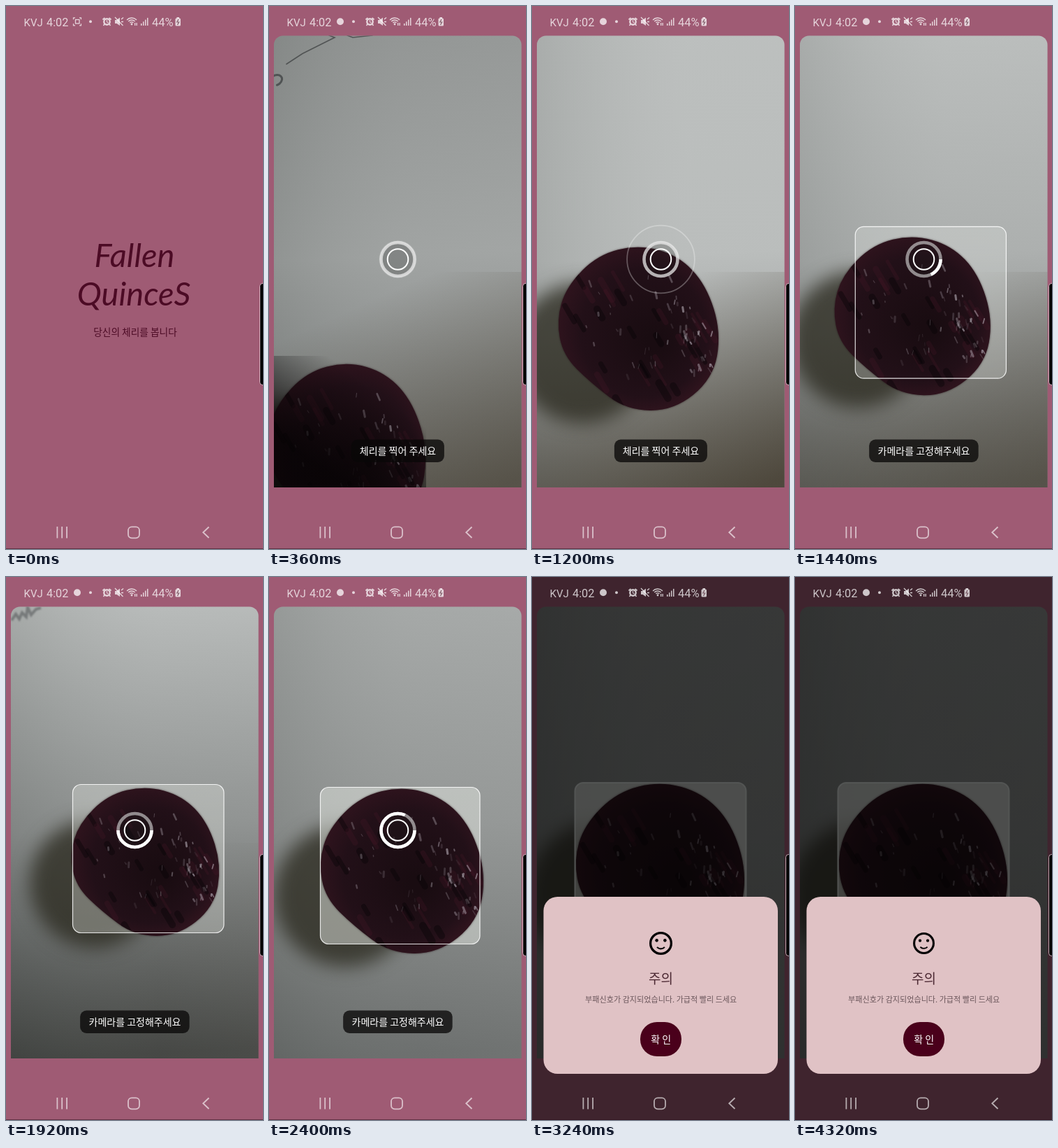
Write an HTML page with a canvas that moves like this. It is 368x776 px and loops after 4.44 s.

```html
<!DOCTYPE html>
<html lang="ko">
<head>
<meta charset="utf-8">
<title>Cherry scanner</title>
<style>
  html, body { margin: 0; width: 100%; height: 100%; overflow: hidden; background: #9f5b74; }
  canvas { display: block; width: 368px; height: 776px; }
</style>
</head>
<body>
<canvas id="stage"></canvas>
<script>
const W = 368, H = 776, LOOP = 4440, STEP = 120;
const KR = '"Noto Sans CJK KR", "Noto Sans CJK JP", "Noto Sans CJK", sans-serif';
const PINK = '#9f5b74';
const canvas = document.getElementById('stage');
const ctx = canvas.getContext('2d');
const ratio = window.devicePixelRatio || 1;
canvas.width = W * ratio;
canvas.height = H * ratio;

// time, cherry x, y, rx, ry, grey at top, middle, bottom, corner shade
const CAMERA = [
  [240, 108, 645, 113, 121, 144, 160, 122, .5],
  [360, 112, 632, 113, 121, 147, 161, 125, .5],
  [1200, 153, 461, 115, 117, 190, 188, 134, .62],
  [1920, 200, 407, 106, 106, 187, 142, 66, .12],
  [2400, 191, 420, 117, 118, 167, 147, 106, 0],
  [2640, 184, 417, 121, 122, 134, 127, 112, 0]
];
// time, x, y, width, height, brightness inside
const FRAME = [
  [1320, 84, 320, 216, 218, .28],
  [1920, 95.5, 296.5, 216.5, 212, .34],
  [2400, 73.5, 300.5, 228.5, 224, .5],
  [2640, 61.5, 294, 245, 244, .62]
];
const BLOB = [[-1, -.1], [-.88, -.5], [-.5, -.88], [0, -1], [.48, -.87], [.82, -.52],
  [1, .05], [.9, .6], [.42, .98], [-.15, .97], [-.58, .65], [-.92, .32]];

const clamp = v => Math.max(0, Math.min(1, v));
const ease = v => { v = clamp(v); return v * v * (3 - 2 * v); };
const easeOut = v => 1 - Math.pow(1 - clamp(v), 3);
const grey = v => `rgb(${v - 2},${v + 1},${v})`;

function sample(keys, t) {
  if (t <= keys[0][0]) return keys[0].slice(1);
  for (let i = 1; i < keys.length; i++) {
    const a = keys[i - 1], b = keys[i];
    if (t <= b[0]) {
      const k = (t - a[0]) / (b[0] - a[0]);
      return a.slice(1).map((v, j) => v + (b[j + 1] - v) * k);
    }
  }
  return keys[keys.length - 1].slice(1);
}

function random(seed) {
  return () => (seed = (seed * 16807) % 2147483647) / 2147483647;
}

function group(draw) {
  ctx.save();
  draw();
  ctx.restore();
}

function round(x, y, w, h, r) {
  ctx.beginPath();
  ctx.roundRect(x, y, w, h, r);
}

function circle(x, y, r) {
  ctx.beginPath();
  ctx.arc(x, y, r, 0, Math.PI * 2);
}

function line(points, width) {
  ctx.lineWidth = width;
  ctx.beginPath();
  points.forEach(p => ctx.lineTo(p[0], p[1]));
  ctx.stroke();
}

function text(str, x, y, font, color, align = 'center') {
  ctx.font = font;
  ctx.fillStyle = color;
  ctx.textAlign = align;
  ctx.textBaseline = 'alphabetic';
  ctx.fillText(str, x, y);
}

function blobPath() {
  const n = BLOB.length, at = i => BLOB[i % n];
  const mid = (a, b) => [(a[0] + b[0]) / 2, (a[1] + b[1]) / 2];
  ctx.beginPath();
  ctx.moveTo(...mid(at(n - 1), at(0)));
  for (let i = 0; i < n; i++) ctx.quadraticCurveTo(...at(i), ...mid(at(i), at(i + 1)));
  ctx.closePath();
}

function cherry(cx, cy, rx, ry) {
  group(() => {
    ctx.translate(cx, cy);
    ctx.scale(rx * 1.025, ry * 1.025);
    blobPath();
    const g = ctx.createRadialGradient(.2, .15, .1, 0, 0, 1.05);
    g.addColorStop(0, '#190c11');
    g.addColorStop(.7, '#221018');
    g.addColorStop(1, '#31141e');
    ctx.fillStyle = g;
    ctx.shadowColor = 'rgba(30,14,18,.7)';
    ctx.shadowBlur = 3;
    ctx.fill();
    ctx.shadowBlur = 0;
    ctx.clip();
    ctx.lineCap = 'round';
    const rnd = random(71);
    for (let i = 0; i < 34; i++) {
      const x = rnd() * 1.7 - .9, y = rnd() * 1.7 - .85;
      const len = .06 + rnd() * .2;
      ctx.strokeStyle = i % 2 ? 'rgba(78,24,42,.22)' : 'rgba(6,3,5,.4)';
      line([[x, y], [x + len * .6, y + len]], .03 + rnd() * .06);
    }
    for (let i = 0; i < 62; i++) {
      const right = i % 5 < 3;
      const x = right ? .3 + rnd() * .6 : rnd() * 1.1 - .65;
      const y = right ? x * .8 - .75 + rnd() * .8 : rnd() * 1.3 - .65;
      const len = .015 + rnd() * .06;
      ctx.strokeStyle = `rgba(196,188,198,${.08 + rnd() * (right ? .5 : .28)})`;
      line([[x, y], [x + len * (rnd() - .3), y + len]], .008 + rnd() * .02);
    }
  });
}

function penMarks(t, cx, cy) {
  group(() => {
    ctx.lineCap = 'round';
    ctx.filter = 'blur(.7px)';
    ctx.strokeStyle = 'rgba(62,64,66,.75)';
    ctx.translate(cx - 112, cy - 632);
    line([[25, 83], [48, 68], [72, 56], [94, 45], [86, 42]], 1.6);
    line([[112, 42], [120, 45], [148, 42]], 1.4);
    ctx.lineWidth = 3;
    ctx.beginPath();
    ctx.ellipse(10, 106, 9, 7, -.5, -1.8, 1.8);
    ctx.stroke();
  });
  if (t < 1700 || t > 2160) return;
  group(() => {
    ctx.translate(cx - 200, cy - 407);
    ctx.filter = 'blur(1px)';
    ctx.strokeStyle = 'rgba(92,96,98,.65)';
    line([[8, 62], [14, 53], [19, 60], [23, 51], [29, 57], [31, 43], [36, 54], [43, 46], [50, 44]], 4);
  });
}

function photo(t) {
  const [cx, cy, rx, ry, top, mid, bottom, corner] = sample(CAMERA, t);
  group(() => {
    round(7, 42.5, 354.5, 645.5, [13, 13, 0, 0]);
    ctx.clip();
    let g = ctx.createLinearGradient(0, 42, 30, 688);
    g.addColorStop(0, grey(top));
    g.addColorStop(.5, grey(mid));
    g.addColorStop(1, grey(bottom));
    ctx.fillStyle = g;
    ctx.fillRect(0, 40, W, 650);
    g = ctx.createLinearGradient(7, 0, 361, 0);
    g.addColorStop(0, 'rgba(70,76,72,.16)');
    g.addColorStop(.6, 'rgba(190,194,192,.06)');
    g.addColorStop(1, 'rgba(190,194,192,.1)');
    ctx.fillStyle = g;
    ctx.fillRect(0, 40, W, 650);
    g = ctx.createLinearGradient(170, 410, 300, 700);
    g.addColorStop(0, 'rgba(64,56,42,0)');
    g.addColorStop(1, `rgba(64,56,42,${corner * 1.3})`);
    ctx.fillStyle = g;
    ctx.fillRect(0, 380, W, 310);
    penMarks(t, cx, cy);

    group(() => {
      ctx.filter = 'blur(13px)';
      ctx.fillStyle = 'rgba(44,43,32,.78)';
      ctx.beginPath();
      ctx.ellipse(cx - rx * .7, cy + ry * .3, rx * .87, ry * .86, .5, 0, Math.PI * 2);
      ctx.fill();
    });

    const boxed = t >= 1320;
    const [x, y, w, h, light] = sample(FRAME, t);
    if (boxed) {
      round(x, y, w, h, 12);
      ctx.fillStyle = `rgba(228,231,226,${light})`;
      ctx.fill();
    }
    cherry(cx, cy, rx, ry);
    if (t < 900) {
      g = ctx.createLinearGradient(140, 540, 60, 650);
      g.addColorStop(0, 'rgba(4,2,3,0)');
      g.addColorStop(1, `rgba(4,2,3,${.8 * clamp((900 - t) / 500)})`);
      ctx.fillStyle = g;
      ctx.fillRect(0, 500, 225, 190);
    }
    if (boxed) {
      round(x, y, w, h, 12);
      ctx.strokeStyle = 'rgba(255,255,255,.85)';
      ctx.lineWidth = t < 2640 ? 1.2 : 2;
      if (t >= 2640) ctx.strokeStyle = 'rgba(215,220,218,.85)';
      ctx.stroke();
    }
  });
}

function reticle(t) {
  const x = 184.5, y = 362, found = t >= 1320;
  circle(x, y, 24);
  ctx.fillStyle = 'rgba(30,30,30,.22)';
  ctx.fill();
  ctx.lineWidth = 4.6;
  ctx.strokeStyle = found ? 'rgba(215,215,215,.62)' : 'rgba(235,235,235,.74)';
  ctx.stroke();
  if (found) {
    ctx.beginPath();
    ctx.arc(x, y, 24, 0, Math.PI * 2 * clamp((t - 1170) / 1500));
    ctx.strokeStyle = '#fff';
    ctx.stroke();
  } else {
    const p = t - 280;
    const alpha = ease(p / 333) * (1 - ease((p - 667) / 500));
    const grow = easeOut((p - 333) / 833);
    circle(x, y, 25 + 24 * grow);
    ctx.lineWidth = 4.5 - 2.8 * grow;
    ctx.strokeStyle = `rgba(255,255,255,${alpha * .6})`;
    ctx.stroke();
  }
  circle(x, y, 14.8);
  ctx.lineWidth = 2;
  ctx.strokeStyle = '#fff';
  ctx.stroke();
}

function prompt(t) {
  const found = t >= 1320, w = found ? 156.5 : 133;
  round(184.4 - w / 2, 619.5, w, 32.5, 9);
  ctx.fillStyle = 'rgba(8,7,7,.76)';
  ctx.fill();
  text(found ? '카메라를 고정해주세요' : '체리를 찍어 주세요', 184.5, 641, '14px ' + KR, '#fff');
}

function sheet(t) {
  const up = easeOut((t - 2900) / 330);
  ctx.fillStyle = `rgba(0,0,0,${.6 * up})`;
  ctx.fillRect(0, 0, W, H);
  ctx.translate(0, (1 - up) * 320);
  round(16.5, 457, 335.5, 253, 20);
  ctx.fillStyle = '#e0c2c5';
  ctx.fill();
  group(() => {
    const pulse = 1 + .033 * Math.cos((t - 3240) / 720 * Math.PI * 2);
    ctx.translate(184.5, 523.5);
    ctx.scale(pulse, pulse);
    ctx.strokeStyle = ctx.fillStyle = '#050304';
    ctx.lineWidth = 3.2;
    circle(0, 0, 14.4);
    ctx.stroke();
    for (const side of [-1, 1]) {
      circle(side * 5.7, -4, 2.2);
      ctx.fill();
    }
    ctx.lineWidth = 2;
    ctx.beginPath();
    ctx.arc(0, .6, 7, Math.PI * .23, Math.PI * .77);
    ctx.stroke();
  });
  text('주의', 184.5, 581, '19px ' + KR, '#4b2832');
  text('부패신호가 감지되었습니다. 가급적 빨리 드세요', 184.7, 608, '300 11.1px ' + KR, '#6b565b');
  round(155, 636, 59, 49, 24);
  ctx.fillStyle = '#4a001b';
  ctx.fill();
  text('확 인', 184.7, 666, '14px ' + KR, '#fff');
}

function splash() {
  ctx.fillStyle = PINK;
  ctx.fillRect(0, 0, W, H);
  const ink = '#4c0b25', script = 'italic 47px Lato, sans-serif';
  text('Fallen', 184, 373, script, ink);
  text('QuinceS', 183, 428, script, ink);
  text('당신의 체리를 봅니다', 185, 471, '500 13.7px ' + KR, ink);
}

function statusBar(capturing) {
  const ink = '#fff';
  ctx.globalAlpha = .74;
  text('KVJ', 25.5, 29, '15px Roboto, sans-serif', ink, 'left');
  text('4:02', 58, 29, '16.3px Roboto, sans-serif', ink, 'left');
  text('44%', 209, 29, '16.5px Roboto, sans-serif', ink, 'left');
  ctx.strokeStyle = ctx.fillStyle = ink;
  if (capturing) {
    ctx.lineWidth = 1.3;
    ctx.strokeRect(99.5, 19.5, 5.5, 5.5);
    for (const [sx, sy] of [[-1, -1], [1, -1], [1, 1], [-1, 1]])
      line([[102 + sx * 3, 22.3 + sy * 5.5], [102 + sx * 5.5, 22.3 + sy * 5.5], [102 + sx * 5.5, 22.3 + sy * 3]], 1.2);
  } else {
    circle(102, 22.3, 5);
    ctx.fill();
  }
  circle(121, 22.3, 2);
  ctx.fill();
  // alarm
  circle(144.5, 22.5, 4.2);
  ctx.lineWidth = 2.4;
  ctx.stroke();
  line([[144.5, 20], [144.5, 23], [146.5, 24]], 1.2);
  line([[138.5, 19.5], [141.5, 17]], 2);
  line([[150.5, 19.5], [147.5, 17]], 2);
  line([[141, 26], [139.5, 28]], 1.6);
  line([[148, 26], [149.5, 28]], 1.6);
  // muted speaker
  ctx.beginPath();
  [[156, 20], [158.5, 20], [163, 16.5], [163, 28], [158.5, 25], [156, 25]].forEach(p => ctx.lineTo(...p));
  ctx.fill();
  line([[156, 16], [167.5, 28]], 1.3);
  line([[165, 19], [168, 16.5]], 1.5);
  line([[165, 22.5], [168, 22.5]], 1.5);
  // wifi
  for (const r of [3.5, 6.5, 9.5]) {
    ctx.lineWidth = 1.4;
    ctx.beginPath();
    ctx.arc(180, 26.5, r, Math.PI * 1.24, Math.PI * 1.76);
    ctx.stroke();
  }
  circle(180, 26, 1.4);
  ctx.fill();
  ctx.fillRect(184, 24, 1.3, 4);
  ctx.fillRect(186.5, 24, 1.3, 4);
  // signal
  for (let i = 0; i < 4; i++) ctx.fillRect(193 + i * 3, 25 - i * 2.7, 1.5, 3 + i * 2.7);
  // battery
  round(242.5, 17.5, 7.5, 11, 1.5);
  ctx.fill();
  ctx.fillRect(244.5, 16, 3.5, 2);
  ctx.strokeStyle = '#5c3442';
  line([[247, 19], [244.8, 23], [247.7, 23], [245.5, 27]], 1.2);
}

function navBar() {
  ctx.globalAlpha = .62;
  ctx.strokeStyle = ctx.fillStyle = '#fff';
  for (const x of [72.5, 79.3, 86.2]) ctx.fillRect(x, 744, 1.8, 16.5);
  ctx.lineWidth = 1.8;
  round(175, 744.3, 16, 16, 5);
  ctx.stroke();
  line([[290.5, 744.5], [282.3, 752.3], [290.5, 760]], 1.9);
}

function edgePanel() {
  round(363.5, 396.5, 10, 145, 4);
  ctx.fillStyle = '#000';
  ctx.fill();
  ctx.strokeStyle = 'rgba(255,225,235,.75)';
  ctx.lineWidth = 1;
  ctx.stroke();
  ctx.fillStyle = 'rgba(40,10,22,.5)';
  ctx.fillRect(0, 775, W, 1);
}

function render(t) {
  ctx.setTransform(ratio, 0, 0, ratio, 0, 0);
  ctx.fillStyle = PINK;
  ctx.fillRect(0, 0, W, H);
  if (t < 240) {
    group(splash);
  } else {
    photo(t);
    if (t < 2700) {
      group(() => reticle(t));
      group(() => prompt(t));
    }
    if (t > 2900) group(() => sheet(t));
  }
  group(() => statusBar(t < 240));
  group(navBar);
  group(edgePanel);
}

let shown = -1;
const start = performance.now();
function tick() {
  const t = Math.floor(((performance.now() - start) % LOOP) / STEP) * STEP;
  if (t !== shown) render(shown = t);
  requestAnimationFrame(tick);
}
tick();
</script>
</body>
</html>
```
